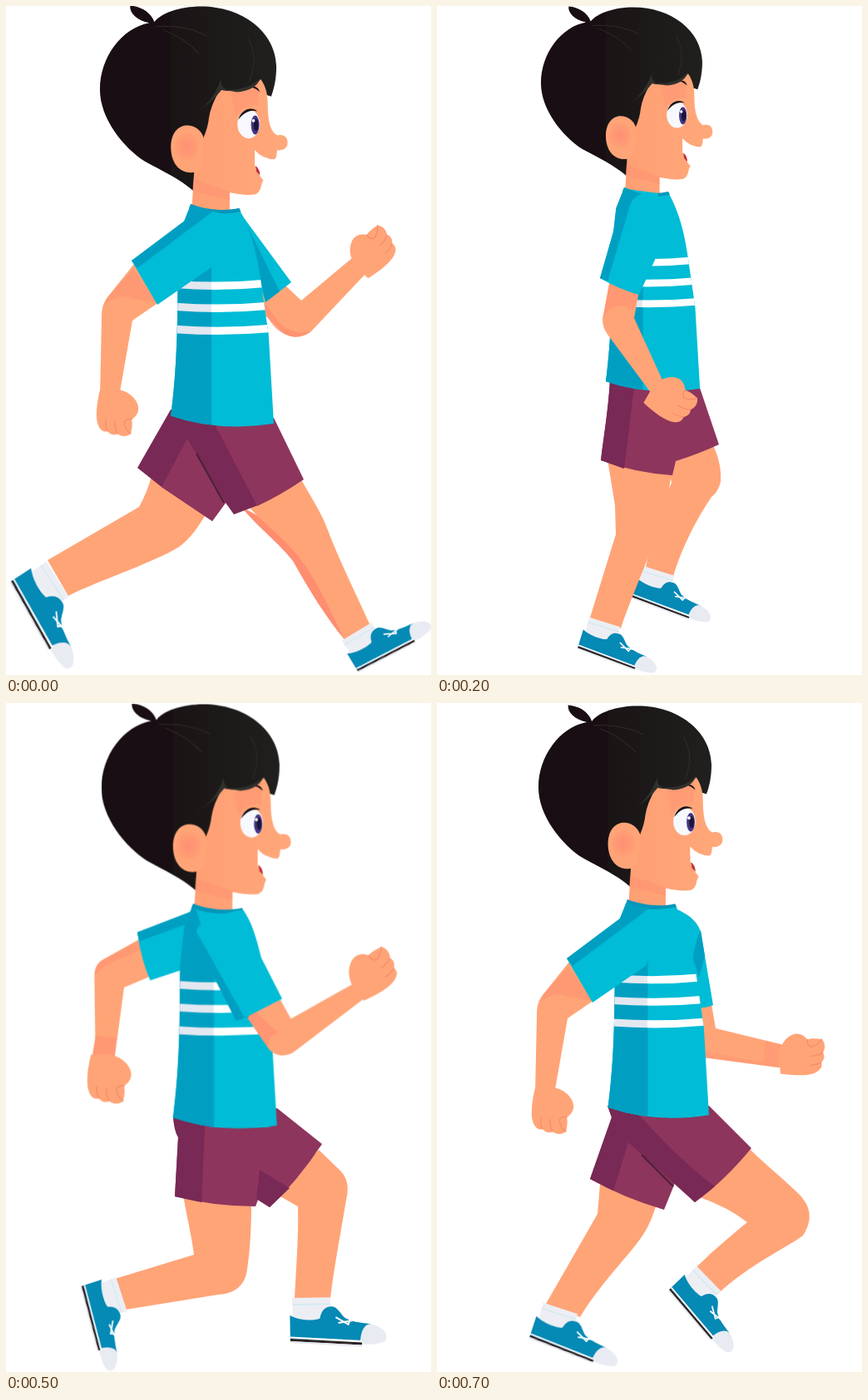
An HTML page without scripts for the animation above (800 ms loop, 511 by 804 pixels).

```html
<!DOCTYPE html>
<html lang="en">
<head>
<meta charset="utf-8">
<title>Walking boy</title>
<style>
html, body { margin: 0; height: 100%; overflow: hidden; background: #fff; }
svg { display: block; width: 100%; height: 100%; }
.skin { fill: #ffa477; }
.blush { fill: #ff8d70; }
.shirt { fill: #00bcd6; }
.fold { fill: #009fc2; }
.short { fill: #8e355d; }
.crease { fill: #782955; }
.line { fill: none; stroke: #f58a6c; stroke-width: 1.2; stroke-linecap: round; }
.pose { opacity: 0; animation: show 800ms step-end calc(var(--i) * 100ms - 800ms) infinite; }
@keyframes show { 0% { opacity: 1; } 12.5%, 100% { opacity: 0; } }
</style>
</head>
<body>
<svg viewBox="0 0 511 804" preserveAspectRatio="none">
<defs>
  <linearGradient id="face" x1="0" x2="1">
    <stop stop-color="#ff9f74"/><stop offset="1" stop-color="#ffa87a"/>
  </linearGradient>
  <linearGradient id="hair" gradientUnits="userSpaceOnUse" x1="123" x2="327" y1="0" y2="0">
    <stop offset=".4" stop-color="#180e13"/><stop offset=".4" stop-color="#1a1415"/><stop offset="1" stop-color="#20201e"/>
  </linearGradient>
  <linearGradient id="stripe" gradientUnits="userSpaceOnUse" x1="213" x2="320" y1="0" y2="0">
    <stop offset=".36" stop-color="#e3e7f0"/><stop offset=".36" stop-color="#fff"/>
  </linearGradient>
  <radialGradient id="ear">
    <stop offset=".2" stop-color="#ff9275"/><stop offset="1" stop-color="#ffa074"/>
  </radialGradient>
  <clipPath id="trunk">
    <path id="trunkShape" d="M228 230C245 239 270 240 284 235C299 262 305 290 309 318L318 380L324 483Q260 493 205 474C212 420 213 370 213 300L218 255Z"/>
  </clipPath>

  <!-- head and trunk -->
  <g id="body">
    <path fill="url(#hair)" d="M158 0C171 1 182 8 186 19C193 9 215 1 240 1C287 1 326 30 327 70C327 86 324 97 321 105L300 98L250 150L231 214C215 200 195 191 175 180C150 164 123 130 123 97C123 60 148 26 180 20C165 17 157 8 158 0Z"/>
    <path fill="url(#face)" d="M262 97C280 102 300 95 309 85C316 95 317 105 317 115C317 132 320 146 328 150C338 148 340 154 340 159C340 165 334 168 328 167C327 172 328 176 324 178Q310 177 302 167V185C307 188 308 193 308 197L312 202C308 207 311 214 303 218C293 220 280 217 273 216V240H229L232 190L243 152Q248 140 249 130Q251 115 262 97Z"/>
    <path class="blush" opacity=".4" d="M275 101Q294 100 306 90V116Q290 112 280 128ZM231 200L273 215V225L230 214Z"/>
    <path fill="#fff" d="M302 167Q310 177 326 178Q322 183 312 181L302 178Z"/>
    <path fill="#c3303f" d="M303 185Q308 189 308 196L304 192Z"/>
    <ellipse cx="295" cy="137" rx="13" ry="16.5" fill="#f7f9ff"/>
    <ellipse cx="302.500" cy="138" rx="4.800" ry="11" fill="#453583"/>
    <ellipse cx="303.500" cy="138" rx="2.800" ry="7" fill="#1c1539"/>
    <circle cx="300.500" cy="133" r="1.800" fill="#fff"/>
    <path fill="#1a1115" d="M283 132C286 120 298 116 305 122C296 120 289 124 283 132ZM298 94Q305 92 308 100Q304 96 298 94Z"/>
    <path fill="#30302d" d="M229 126Q253 114 263 85Q263 96 270 97Q296 98 309 83Q304 98 282 100L264 97Q250 115 229 126Z"/>
    <path fill="none" stroke="#302c2a" d="M188 24Q222 22 247 35M196 28Q222 38 238 56M294 38Q307 60 296 87"/>
    <path class="skin" d="M243 153C238 134 206 130 205 163C205 182 215 193 228 193C237 193 242 188 242 176Z"/>
    <ellipse cx="223" cy="163" rx="14" ry="16" fill="url(#ear)"/>
    <use href="#trunkShape" class="shirt"/>
    <g clip-path="url(#trunk)">
      <path class="fold" d="M200 225H228L252 300V500H200Z"/>
      <path fill="none" stroke="url(#stripe)" stroke-width="9" d="M210 322Q262 326 315 321M210 348Q265 352 318 347M210 374Q265 378 322 373"/>
    </g>
    <path fill="#0596ba" d="M228 229C245 236 268 238 284 234L286 238Q255 245 226 234Z"/>
  </g>

  <g id="fist">
    <path class="skin" d="M-21-29C-25-12-27 5-23 14C-20 22-14 22-12 21C-8 26-3 26 0 24C4 28 12 28 16 24C18 16 18 10 17 7C24 2 27-4 24-12C20-22 10-27 2-29Z"/>
    <path class="line" d="M-12 21Q-15 14-14 7M0 24Q-4 17-3 9M16 24Q9 19 8 10Q12 5 17 7"/>
  </g>

  <!-- heel of the sole at 0,0, toe to the right -->
  <g id="shoe">
    <path fill="#eceef4" d="M3-57H49L48-28H4Z"/>
    <path fill="none" stroke="#cfeaf1" stroke-width="1.500" d="M3-49H49"/>
    <path fill="#0589b5" d="M0-36C12-29 30-29 36-32C38-41 42-46 50-46C57-46 60-38 66-32C74-27 82-26 97-24L88-3L0-8Z"/>
    <path fill="#e9ebf3" d="M84 0C84-16 90-25 97-24C110-21 118-13 115-5C112 0 100 1 84 0Z"/>
    <path fill="none" stroke="#fff" stroke-width="2" d="M0-9.500L86-3.500"/>
    <path fill="none" stroke="#2b2326" stroke-width="3" d="M0-6.500L86-.5"/>
    <path fill="none" stroke="#e4e7ee" stroke-width="2" d="M0-4L86 2"/>
    <path fill="none" stroke="#fff" stroke-width="2" d="M55-33L70-24L74-35M58-26L77-29"/>
  </g>

  <!-- arms -->
  <g id="nearFore">
    <path class="skin" d="M289 358L328 339L340 361L413 320L430 333L342 400C330 406 318 402 313 393Z"/>
    <path class="blush" opacity=".6" d="M289 358L300 353L325 377Q314 380 313 393Z"/>
    <use href="#fist" transform="translate(434 306)rotate(-127)"/>
    <path class="fold" d="M226 262L277 363L292 359L250 262Z"/>
    <path class="shirt" d="M232 262C232 248 262 240 285 236C296 250 302 275 306 291L330 338L287 360L240 276Z"/>
  </g>
  <g id="farBack">
    <path class="skin" d="M166 270L127 292C118 296 115 303 115 312L116 385L112 407H138L149 325L180 312Z"/>
    <path class="blush" opacity=".5" d="M166 272L127 292Q116 298 116 310L128 300L168 282ZM116 380L140 383L138 407H112Z"/>
    <use href="#fist" transform="translate(132 431)"/>
    <path class="shirt" d="M164 262L230 237V300L179 317Q169 295 164 262Z"/>
    <path class="fold" d="M164 262L226 238L222 252L167 272Z"/>
  </g>
  <g id="nearBack">
    <path class="skin" d="M154 310L122 350C116 358 115 365 115 375L113 469H136L152 378L184 356Z"/>
    <path class="blush" opacity=".45" d="M153 316L122 350L118 360Q135 344 153 352L182 357Z"/>
    <use href="#fist" transform="translate(134 490)"/>
    <path class="shirt" d="M222 241L215 258L151 306L182 359L247 314L262 250Z"/>
    <path class="fold" d="M222 240L215 258L151 306L158 315L238 255L250 246Z"/>
  </g>
  <g id="farFore">
    <path class="skin" d="M305 345L335 335L355 354L416 303L434 320L366 392C355 400 340 400 330 390L312 372Z"/>
    <path class="blush" opacity=".7" d="M312 358L330 382Q345 396 366 391Q350 402 334 394Q316 384 312 365Z"/>
    <use href="#fist" transform="translate(441 292)rotate(-135)"/>
    <path class="shirt" d="M280 246L290 260L343 332L312 356L295 300Z"/>
    <path class="fold" d="M289 262L329 343L312 356L300 300Z"/>
  </g>
  <g id="nearDown">
    <path class="skin" d="M208 328L199 376C199 385 202 390 206 396L261 470L274 456L237 375L243 342Z"/>
    <path class="blush" opacity=".5" d="M208 330L200 374Q214 352 236 366L242 345Z"/>
    <use href="#fist" transform="translate(284 473)rotate(-60)"/>
    <path class="shirt" d="M228 220L213 268L196 327Q220 341 243 347L262 305L266 225Z"/>
    <path class="fold" d="M225 218L213 268L196 327L205 331L232 240Q236 228 246 226Z"/>
  </g>

  <!-- strides -->
  <g id="plant">
    <path class="skin" d="M330 585L376 537L402 562C412 572 412 585 409 597C402 640 394 680 390 716H347C349 675 352 640 351 605L328 592Z"/>
    <use href="#shoe" transform="translate(342 772)rotate(-1)"/>
    <path class="skin" d="M213 592C218 620 224 645 226 663L131 692L144 729L255 711C275 710 288 700 290 680C294 655 295 625 295 600Z"/>
    <use href="#shoe" transform="translate(87 702)rotate(72)scale(.93 .82)"/>
    <path class="short" d="M201 496C202 515 207 517 207 522L203 593Q250 605 300 605L303 597L317 606Q350 575 380 530L326 487Z"/>
    <path class="crease" d="M201 496L239 508L235 600L203 593L207 522Q202 515 201 496ZM305 561L341 583L317 606L301 596Z"/>
  </g>
  <g id="lift">
    <path class="skin" d="M196 578L193 614L131 722L172 738C195 700 225 670 243 646C255 630 260 615 264 602Z"/>
    <use href="#shoe" transform="translate(110 766)rotate(18)scale(.95 .85)"/>
    <path class="skin" d="M316 588L376 536C395 555 420 575 435 590C450 605 452 622 440 640C420 655 375 675 338 710L311 679C335 655 360 635 373 624Q350 606 316 594Z"/>
    <use href="#shoe" transform="translate(276 708)rotate(46)scale(.91 .84)"/>
    <path class="short" d="M205 484L210 498L184 572Q225 595 273 609L286 577L310 600Q345 575 378 535L327 484Z"/>
    <path class="crease" d="M205 484L243 495Q290 548 334 581L310 600L230 528L212 586L184 572L210 498Z"/>
    <path fill="none" stroke="#4a2038" stroke-width="2" d="M246 543L284 581"/>
  </g>
  <g id="reach">
    <path class="skin" d="M175 565Q170 584 160 602L50 666L75 709C100 695 180 668 208 650C222 640 232 625 242 608Z"/>
    <use href="#shoe" transform="translate(2 694)rotate(57)scale(1.090 .93)"/>
    <path class="blush" d="M283 602L355 640L409 764C385 735 365 703 345 667C325 642 303 627 283 602Z"/>
    <path class="skin" d="M290 600L353 566C370 595 382 615 387 630C400 665 425 715 439 747L408 764C385 715 370 685 352 662C335 640 310 622 290 600Z"/>
    <use href="#shoe" transform="translate(425 803)rotate(-31)scale(.9 .8)"/>
    <path class="crease" d="M198 485L158 555L187 578L248 619L264 597L274 611L303 600L249 495Z"/>
    <path class="short" d="M247 495L302 601Q330 588 358 569L322 495ZM218 520L187 578L248 619L264 597Z"/>
    <path fill="none" stroke="#4a2038" stroke-width="2" d="M229 538L262 597"/>
  </g>

  <g id="upperFront">
    <use href="#body" transform="translate(-15 -.5)scale(1.040)"/>
    <use href="#nearBack"/>
  </g>
</defs>

<g class="pose" style="--i:0">
  <use href="#farFore"/>
  <use href="#reach"/>
  <use href="#upperFront"/>
</g>

<g class="pose" style="--i:1">
  <use href="#farFore" transform="translate(.6 1)scale(1.010)"/>
  <use href="#plant"/>
  <use href="#upperFront" transform="translate(.6 1)scale(1.010)"/>
</g>

<g class="pose" style="--i:2">
  <path class="skin" d="M268 555L332 528C340 545 342 560 341 572Q338 584 330 590C310 620 295 650 284 685L251 674L268 600Z"/>
  <use href="#shoe" transform="translate(233 714)rotate(17)scale(.85 .76)"/>
  <path class="skin" d="M205 545L214 600L215 635L184 735L221 748C235 705 262 650 275 600L283 558Z"/>
  <path fill="#fff" d="M281 568L279 580L282 573Z"/>
  <use href="#shoe" transform="translate(168 775)rotate(17)scale(.85 .75)"/>
  <path class="short" d="M208 450C206 485 200 520 197 546Q238 561 283 564L287 547Q315 538 339 527L315 456Z"/>
  <path class="crease" d="M208 450C206 485 200 520 197 546L225 556L237 458Z"/>
  <use href="#body" transform="translate(8 .5)scale(.951)"/>
  <use href="#nearDown"/>
</g>

<g class="pose" style="--i:3">
  <use href="#farBack" transform="translate(-3.500 2.500)scale(1.020)"/>
  <use href="#lift"/>
  <g transform="translate(-3.500 2.500)scale(1.020)">
    <use href="#body"/>
    <use href="#nearFore" transform="rotate(14 262 255)"/>
  </g>
</g>

<g class="pose" style="--i:4">
  <use href="#farBack"/>
  <path class="skin" d="M313 570L367 522C378 535 390 550 394 562C405 595 420 635 437 678L400 696C385 665 365 625 343 590Z"/>
  <use href="#shoe" transform="translate(419 738)rotate(-26)scale(.92 .8)"/>
  <path class="skin" d="M196 545C192 575 188 605 182 627L110 706L139 732C165 705 200 680 218 664C228 660 235 650 240 640L267 580Z"/>
  <use href="#shoe" transform="translate(79 739)rotate(40)scale(.88 .8)"/>
  <path class="short" d="M205 472L211 490L188 541Q228 570 270 586L281 562L302 581Q335 552 371 517L324 467Z"/>
  <path class="crease" d="M205 472L246 482L214 557L188 541L211 490ZM293 532L327 562L302 581L281 562Z"/>
  <use href="#body"/>
  <use href="#nearFore"/>
</g>

<g class="pose" style="--i:5">
  <use href="#farBack" transform="translate(-14.500 .5)scale(1.050)"/>
  <use href="#plant"/>
  <g transform="translate(-14.500 .5)scale(1.050)">
    <use href="#body"/>
    <use href="#nearFore"/>
  </g>
</g>

<g class="pose" style="--i:6">
  <path class="skin" d="M232 574L236 610C232 650 222 690 215 729L250 738C262 690 285 645 295 608L293 575Z"/>
  <use href="#shoe" transform="translate(209 778)rotate(-1)scale(.95 .83)"/>
  <path class="skin" d="M290 575L353 555C365 585 380 620 384 640C388 658 380 668 370 672Q310 702 275 731L253 698L321 644L296 608Z"/>
  <use href="#shoe" transform="translate(218 728)rotate(48)scale(.88 .8)"/>
  <path class="short" d="M211 468L214 577L265 581L268 589Q315 578 354 558L325 474Z"/>
  <path class="crease" d="M211 468L256 478Q284 525 297 581L268 589L242 528L244 579L214 577Z"/>
  <use href="#body" transform="translate(4.500 1)scale(.988)"/>
  <use href="#nearDown" transform="matrix(1.080 0 0 1.027 -17.500 3)"/>
</g>

<g class="pose" style="--i:7">
  <path class="skin" d="M316 360L330 362L335 391L413 410L424 414L420 438H410L320 426Z"/>
  <path class="blush" opacity=".35" d="M320 418L392 432L395 406L413 410L410 438L320 426Z"/>
  <use href="#fist" transform="translate(440 422)rotate(-95)"/>
  <path class="shirt" d="M285 247C305 254 316 266 318 280L332 363Q322 367 314 366L300 300Z"/>
  <use href="#lift"/>
  <use href="#body" transform="translate(-3.500 2.500)scale(1.020)"/>
  <path class="shirt" d="M285 247C305 254 316 266 318 280L309 312L296 290Z"/>
  <path class="fold" d="M317 273Q308 295 308 308L315 330L322 304Z"/>
  <use href="#nearBack" transform="translate(5 1)"/>
</g>
</svg>
</body>
</html>
```
